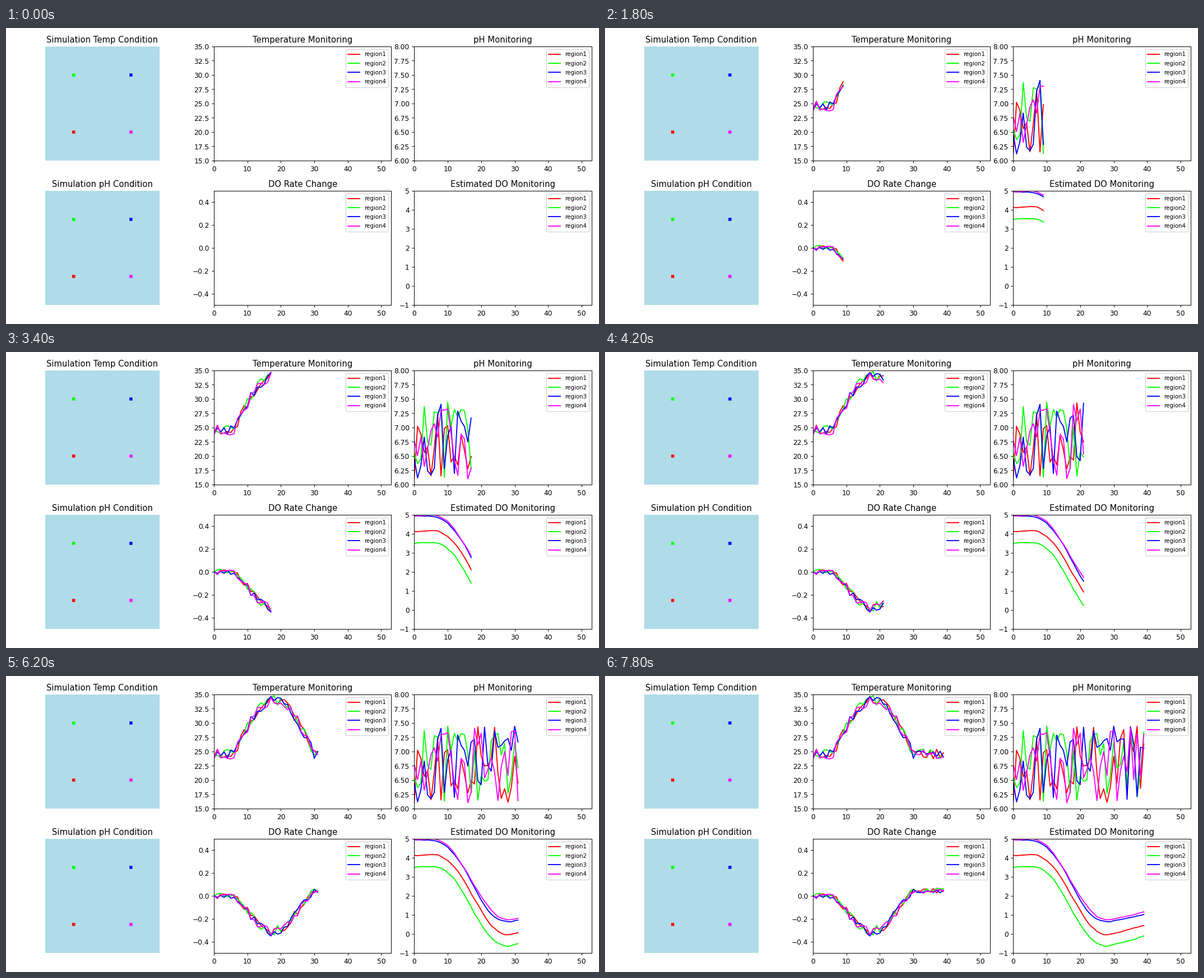
Animation, 1058 px wide and 529 px high, one loop 8 s. Source, as a matplotlib script:

```python
import numpy as np
import matplotlib.pyplot as plt
from matplotlib.animation import FuncAnimation
from matplotlib.patches import Rectangle

W, H = 1058, 529
STEPS = 40
STEP_MS = 200
COLORS = ["#ff0000", "#00ff00", "#0000ff", "#ff00ff"]
NAMES = [f"region{i}" for i in range(1, 5)]
START_OXYGEN = [4.13, 3.50, 4.95, 4.97]
BASE_TEMP = 24.6
WATER = "#b0dbe8"

plt.rcParams["font.family"] = "DejaVu Sans"

rng = np.random.default_rng(12)
steps = np.arange(STEPS)


def temperature():
    """A steady reading with one warm spell, plus sensor noise."""
    spell = np.clip((steps - 6) / 24, 0, 1)
    return (BASE_TEMP + 9.4 * np.sin(np.pi * spell)
            + rng.uniform(-0.9, 0.9, STEPS))


def oxygen(temp, start):
    """Oxygen falls with warmth and recovers slowly as it is depleted."""
    excess = temp - BASE_TEMP
    demand = 0.0225 * excess + 0.0014 * excess ** 2
    rate, level = np.zeros(STEPS), np.full(STEPS, start)
    for i in range(1, STEPS):
        rate[i] = 0.0107 * (4.5 - level[i - 1]) - demand[i]
        level[i] = level[i - 1] + rate[i]
    return rate, level


temps = [temperature() for _ in NAMES]
phs = rng.uniform(6.1, 7.45, (len(NAMES), STEPS))
rates, levels = zip(*map(oxygen, temps, START_OXYGEN))

fig = plt.figure(figsize=(12, 6), dpi=88.16667, facecolor="white")


def add_axes(left, top, right, bottom, title):
    """Axes placed by pixel edges measured from the top left."""
    box = [left / W, 1 - bottom / H, (right - left) / W, (bottom - top) / H]
    ax = fig.add_axes(box)
    ax.set_title(title, fontsize=12, pad=5.5)
    return ax


def add_pond(top, bottom, title):
    ax = add_axes(69.6, top, 274, bottom, title)
    ax.set(xlim=(0, 204), ylim=(0, 204))
    ax.axis("off")
    ax.add_patch(Rectangle((0, 0), 204, 204, color=WATER, lw=0))
    size = 5.4
    for (x, y), color in zip([(51, 51), (51, 153), (153, 153), (153, 51)],
                             COLORS):
        ax.add_patch(Rectangle((x - size / 2, y - size / 2), size, size,
                               color=color, lw=0, snap=False))


def add_chart(left, right, top, bottom, title, ylim, yticks):
    ax = add_axes(left, top, right, bottom, title)
    ax.set(xlim=(0, 53), ylim=ylim)
    ax.set_xticks(range(0, 51, 10))
    ax.set_yticks(yticks)
    lines = [ax.plot([], [], color=c, lw=1.5, label=name)[0]
             for c, name in zip(COLORS, NAMES)]
    ax.legend(loc="upper right", fontsize="small", labelspacing=0.63)
    return lines


ROW_1, ROW_2 = (33, 237), (291, 495)
COL_1, COL_2 = (371.2, 687.2), (728.3, 1045)

add_pond(*ROW_1, "Simulation Temp Condition")
add_pond(*ROW_2, "Simulation pH Condition")

charts = [
    (add_chart(*COL_1, *ROW_1, "Temperature Monitoring", (15, 35),
               np.linspace(15, 35, 9)), temps),
    (add_chart(*COL_2, *ROW_1, "pH Monitoring", (6, 8),
               np.linspace(6, 8, 9)), phs),
    (add_chart(*COL_1, *ROW_2, "DO Rate Change", (-0.5, 0.5),
               [-0.4, -0.2, 0, 0.2, 0.4]), rates),
    (add_chart(*COL_2, *ROW_2, "Estimated DO Monitoring", (-1, 5),
               range(-1, 6)), levels),
]


def update(step):
    count = step + 1
    artists = []
    for lines, series in charts:
        for line, values in zip(lines, series):
            line.set_data(steps[:count], values[:count])
            artists.append(line)
    return artists


anim = FuncAnimation(fig, update, frames=STEPS, interval=STEP_MS,
                     repeat=True, repeat_delay=0, blit=False)
plt.show()
```
